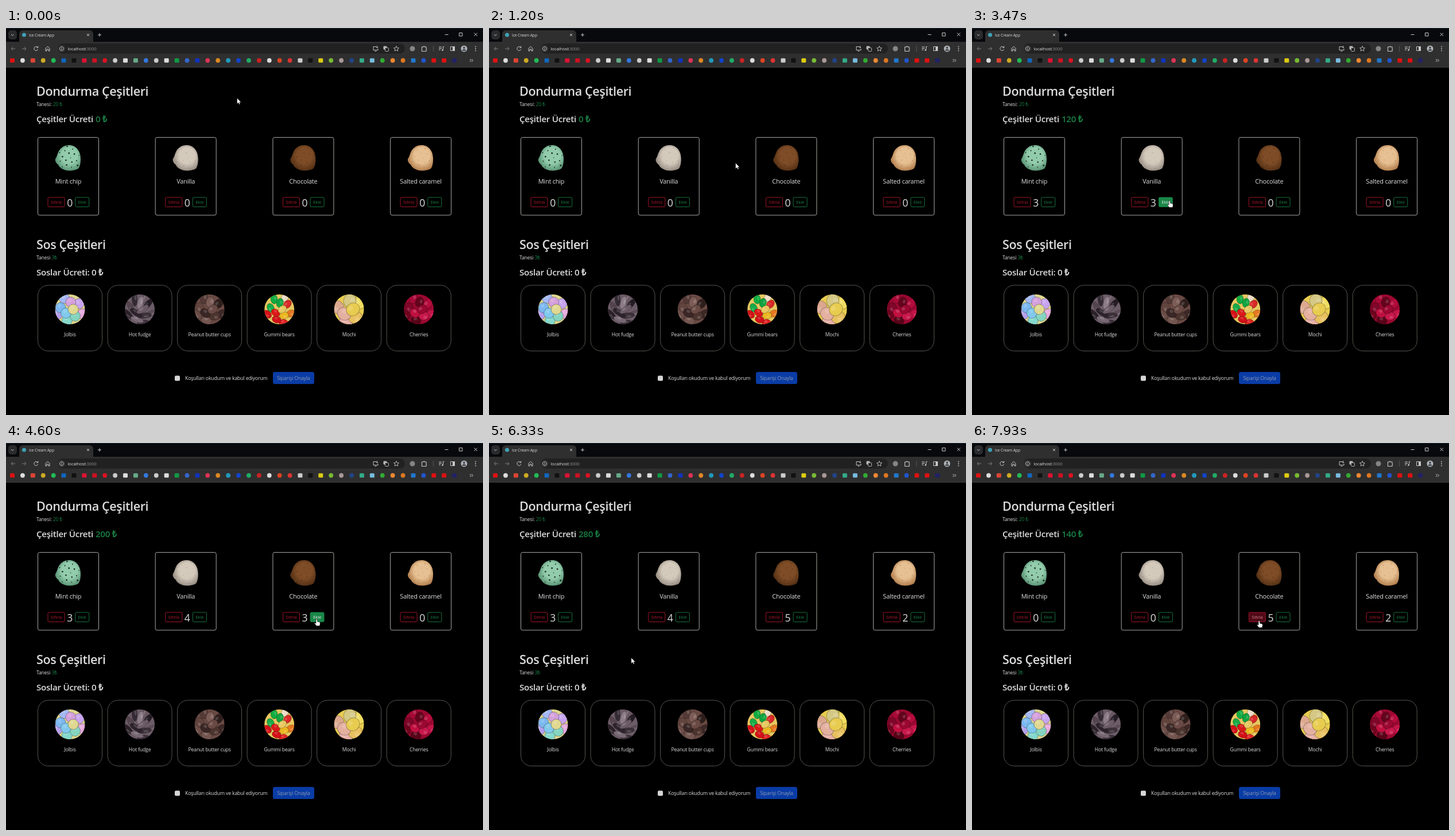
Animation, 831 px wide and 674 px high, one loop 8 s. Source, as an HTML page with a canvas:

```html
<!DOCTYPE html>
<html lang="tr">
<head>
<meta charset="utf-8">
<title>Ice Cream App</title>
<style>
  html, body { margin: 0; width: 100%; height: 100%; overflow: hidden; background: #000; }
  canvas, svg { position: absolute; left: 0; top: 0; width: 831px; height: 674px; }
  text { font-family: "Open Sans", "Noto Sans", sans-serif; letter-spacing: -.02em; white-space: pre; }
</style>
</head>
<body>
<canvas id="shapes" width="831" height="674"></canvas>
<svg id="layer" viewBox="0 0 831 674"></svg>
<script>
const g = document.getElementById('shapes').getContext('2d');
const layer = document.getElementById('layer');
const LOOP = 8000, STEP = 200 / 3, FADE = 150;
const WHITE = '#dcdcdc', GREEN = '#198045', RED = '#b4162c';

// ---------- helpers ----------
function box(x, y, w, h, r, fill, stroke) {
  g.beginPath();
  g.roundRect(x, y, w, h, r);
  if (fill) { g.fillStyle = fill; g.fill(); }
  if (stroke) { g.strokeStyle = stroke; g.lineWidth = 1; g.stroke(); }
}
function disc(x, y, r, fill) {
  g.beginPath();
  g.arc(x, y, r, 0, 7);
  g.fillStyle = fill;
  g.fill();
}
function line(d, color = '#c8c8c8', width = 1) {
  g.strokeStyle = color;
  g.lineWidth = width;
  g.stroke(new Path2D(d));
}
function random(seed) {
  return () => (seed = seed * 16807 % 2147483647) / 2147483647;
}
function node(tag, attrs, parent = layer) {
  const el = document.createElementNS('http://www.w3.org/2000/svg', tag);
  for (const k in attrs) el.setAttribute(k, attrs[k]);
  return parent.appendChild(el);
}
function text(x, y, size, str, fill = WHITE, anchor = 'start', weight = 400) {
  const el = node('text', { x, y, fill, 'font-size': size, 'text-anchor': anchor, 'font-weight': weight });
  el.textContent = str;
  return el;
}
function mix(a, b, k) {
  const part = (c, i) => parseInt(c.slice(i, i + 2), 16);
  return `rgb(${[1, 3, 5].map(i => Math.round(part(a, i) + (part(b, i) - part(a, i)) * k))})`;
}

// ---------- browser window ----------
function drawBrowser() {
  box(0, 0, 831, 25, 0, '#07090c');
  box(0, 0, 831, 1, 0, '#12222a');
  box(0, 24, 831, 44, 0, '#2f2f2f');
  box(0, 68, 831, 1, 0, '#3a3a3a');
  box(4, 4, 15, 16, 5, '#2a2b2c');
  line('M9 11l2.3 2.3 2.3-2.3');
  box(23, 4, 129, 24, [6, 6, 0, 0], '#2f2f2f');
  disc(31.5, 12, 3.6, '#3f9fb4');
  line('M141 10l4 4m0-4l-4 4M163 9v6m-3-3h6');
  line('M764.5 11.5h6M789.5 8.5h5.5v5.5h-5.5zM815.5 8.5l5.5 5.5m0-5.5l-5.5 5.5');

  line('M16 36H9m3-3l-3 3 3 3M28 36h7m-3-3l3 3-3 3', '#7c7c7c');
  line('M55 33.5a3.5 3.5 0 1 0 .7 3.5M55.8 31.5v2.7h-2.7');
  line('M69 35.5l3.5-3.5 3.5 3.5v4.5h-2v-3h-3v3h-2z');
  box(90, 27, 605, 17.5, 9, '#212121');
  disc(97, 36, 6.5, '#313131');
  line('M97 32.5a3.5 3.5 0 1 0 .01 0M97 35.5v2.5M97 34v.8', '#c8c8c8', .9);

  line('M645 32.5h-5v6h8v-2.5M642.5 40.5h3M646.5 31v4m-1.7-1.7l1.7 1.7 1.7-1.7');
  box(657.5, 31.5, 6, 6, 1, '#b8b8b8');
  box(660.5, 34.5, 6, 6, 1, '#212121', '#b8b8b8');
  line('M680 31.5l1.3 3 3.2.3-2.4 2.1.7 3.2-2.8-1.7-2.8 1.7.7-3.2-2.4-2.1 3.2-.3z', '#c8c8c8', .9);
  disc(708, 36, 4.5, '#858585');
  line('M724.5 33h2.5a1.4 1.4 0 0 1 2.6 0h2.4v2.7a1.4 1.4 0 0 1 0 2.4v2.4h-7.5z', '#c8c8c8', 1.1);
  line('M744.5 31v10', '#555');
  line('M754 33h5M754 35.5h5M754 38h3M761.5 38.5v-6h2');
  disc(760.4, 38.5, 1.3, '#c8c8c8');
  line('M774.5 32.5h7v7h-7z');
  box(778, 32, 4, 8, 0, '#c8c8c8');
  disc(798, 36, 5.5, '#b4b8bc');
  disc(798, 34.3, 2, '#4a4f55');
  box(794.8, 36.8, 6.4, 3.2, [3, 3, 1, 1], '#4a4f55');
  for (const y of [32.5, 36, 39.5]) disc(818, y, .9, '#c8c8c8');

  // o = round icon, s = square icon, then its colour
  const marks = 'sd11 oddd sd43 oca2 o2b5 s16b s111 sd13 sc12 od12 occc sddd s6a8 o37d occc sddd ' +
    's194 o36c s13b od35 od82 o29b o14c o2a6 oc22 oddd od42 od33 sccc s111 sdc1 o7b3 oa99 o248 ' +
    's3a8 s7bd o3a3 oe83 od72 s27c o25c sd11 sd11 s226';
  marks.split(' ').forEach((m, i) => {
    const x = 11 + i * 17.91, color = '#' + m.slice(1);
    if (m[0] === 'o') disc(x, 56.5, 3.9, color);
    else box(x - 4, 52.7, 8, 7.6, 1.5, color);
  });
  line('M808 54l2.3 2.5-2.3 2.5m3.2-5l2.3 2.5-2.3 2.5');

  text(40, 14.5, 6.75, 'Ice Cream App');
  text(107.5, 38.8, 7.85, 'localhost');
  text(138.3, 38.8, 7.85, ':3000', '#8e8e8e');
}

// ---------- pictures ----------
const SCOOP = new Path2D('M2-22C14-22 22-12 22 2C22 9 21 15 18 19C13 22 4 23-3 22C-10 20-15 17-17 12' +
  'C-20 10-23 6-22 2C-20-1-19-4-18-7C-15-16-8-22 2-22Z');

function drawScoop(x, light, dark, spots, spotColor, spotSize) {
  const rnd = random(41 + spots);
  g.save();
  g.translate(x, 226);
  const shade = g.createRadialGradient(3, -7, 4, 2, 0, 26);
  shade.addColorStop(0, light);
  shade.addColorStop(.45, light);
  shade.addColorStop(1, dark);
  g.fillStyle = shade;
  g.fill(SCOOP);
  g.clip(SCOOP);
  for (let i = 0; i < spots; i++) {
    const a = i * 2.4, r = 21 * Math.sqrt((i + .5) / spots);
    disc(1 + r * Math.cos(a), r * Math.sin(a), spotSize * (.6 + .6 * rnd()), spotColor);
  }
  g.restore();
}

// round photo: one overlapping piece per colour, on a sunflower layout
function drawPieces(x, colors, size, ratio) {
  const palette = colors.split(' '), n = palette.length;
  g.save();
  g.beginPath();
  g.arc(x, 490, 26, 0, 7);
  g.clip();
  g.fillStyle = '#' + palette[0];
  g.fillRect(x - 26, 464, 52, 52);
  for (let i = n - 1; i >= 0; i--) {
    const a = i * 2.4, r = 25 * Math.sqrt((i + .5) / n);
    g.save();
    g.translate(x + r * Math.cos(a), 490 + r * Math.sin(a));
    g.rotate(ratio < 1 ? a * .5 - .6 : 0);
    g.scale(1, ratio);
    disc(0, 0, size, '#' + palette[i]);
    g.strokeStyle = 'rgba(0,0,0,.3)';
    g.lineWidth = 1;
    g.stroke();
    disc(-size * .2, -size * .35, size * .35, 'rgba(255,255,255,.15)');
    g.restore();
  }
  g.restore();
}

// ---------- page ----------
const flavours = [
  ['Mint chip', '#92ccac', '#4f8a6a', 17, '#1c2a22', 1.3],
  ['Vanilla', '#d4cabc', '#8c8278', 14, 'rgba(110,95,80,.3)', 1],
  ['Chocolate', '#7e4c26', '#4e2c12', 15, 'rgba(60,30,10,.35)', 1.2],
  ['Salted caramel', '#e6c092', '#a8703e', 16, 'rgba(165,105,55,.35)', 1.1]
];
const sauces = [
  ['Jolbis', 'e0d890 80c8ec d4a0dc 84d4c0 7cb8f0 c8a4f0 84d8cc a4b8f4 e4a8dc b4a0ec', 9, 1],
  ['Hot fudge', '6c5c68 2c222c 8c7c88 3c3038 54444e 241c24 786874 342a34 5c4c58 2a2028 685862 382c36', 12, .4],
  ['Peanut butter cups', '6a4a44 3a2624 7c5c56 4c342e 62443e 2e1e1c 745650 543a36 3c2826 6c4e48', 9.5, .75],
  ['Gummi bears', 'e8c860 dc1818 10a440 ecb820 18ac48 d82828 d41018 10ac40 e47820 d41018 ecdcc4 e02020', 8, .75],
  ['Mochi', 'e8cc50 e4b0a0 d4c884 e8c060 dca890 f0dc60 e8b0a8', 12, .9],
  ['Cherries', '9c0830 c01040 64041c c8184c 80062a b40c3c 580418 a80a38 c41448 70041e', 9, .8]
];
const cardX = i => 55.5 + i * 204.7;

function makeButton(x, w, label, color, fill) {
  node('rect', { x, y: 295, width: w, height: 16.5, rx: 2, fill: 'none', stroke: color, 'stroke-width': .9 });
  const face = node('rect', { x, y: 295, width: w, height: 16.5, rx: 2, fill });
  const caption = text(x + w / 2, 306.2, 7.8, label, color, 'middle');
  return {
    contains: p => p.x >= x && p.x <= x + w && p.y >= 295 && p.y <= 311.5,
    show(k) {
      face.setAttribute('fill-opacity', k);
      caption.setAttribute('fill', mix(color, '#e4e4e4', k));
    }
  };
}

drawBrowser();
text(53, 117.7, 21.6, 'Dondurma Çeşitleri', WHITE, 'start', 600);
text(53, 136.2, 8.6, 'Tanesi:');
text(81.8, 136.2, 8.6, '20 ₺', GREEN);
text(53, 164.3, 15.2, 'Çeşitler Ücreti', WHITE, 'start', 600);
const price = text(156, 164.3, 15.2, '', GREEN, 'start', 600);
text(53, 384.7, 21.6, 'Sos Çeşitleri', WHITE, 'start', 600);
text(53, 403.2, 8.6, 'Tanesi');
text(79.5, 403.2, 8.6, '3₺', GREEN);
text(53, 431.3, 15.2, 'Soslar Ücreti: 0 ₺', WHITE, 'start', 600);

const buttons = [], counts = [];
flavours.forEach(([name, ...look], i) => {
  const x = cardX(i);
  box(x, 190.5, 106, 135.5, 3, null, '#a6a8a2');
  drawScoop(x + 52.5, ...look);
  text(x + 53, 270.5, 11, name, WHITE, 'middle');
  buttons.push(makeButton(x + 17.5, 29, 'Sıfırla', RED, '#a01430'));
  counts.push(text(x + 55.5, 310.5, 17.6, '0', WHITE, 'middle'));
  buttons.push(makeButton(x + 65.2, 24, 'Ekle', GREEN, '#198748'));
});
sauces.forEach(([name, ...look], i) => {
  const x = 55.5 + i * 121.55;
  box(x, 448, 112, 114.5, 18, null, '#55564f');
  drawPieces(x + 56, ...look);
  text(x + 56, 536.5, 8.7, name, WHITE, 'middle');
});
box(294, 605.5, 9, 9, 2, '#d6d6d6');
text(312, 612.7, 8.75, 'Koşulları okudum ve kabul ediyorum');
box(465, 599, 72, 21, 3.5, '#0a3ca6');
text(501, 612.7, 8.75, 'Siparişi Onayla', '#8f9aae', 'middle');

const arrow = node('path', {
  d: 'M0 0V10.2L2.4 8 4 11.3 5.6 10.6 4.1 7.4H7.1Z',
  fill: '#fff', stroke: '#000', 'stroke-width': .5
});
const hand = node('path', {
  d: 'M-1 1Q-1-.5 .2-.5Q1.4-.5 1.4 1V4L5 4.8Q6.5 5.2 6.3 7L5.6 11.5H-.2L-3.4 7.4Q-3.6 6-2.2 6.2L-1 7.2Z',
  fill: '#fff', stroke: '#000', 'stroke-width': .6
});

// ---------- motion ----------
// pointer stops: time, x, y
const path = [
  [0, 402.5, 122], [70, 402.5, 122], [600, 417, 172], [1200, 429.5, 235], [1670, 135, 306],
  [2670, 135, 306], [3070, 344, 301], [3670, 344, 301], [4000, 541, 307], [4930, 541, 307],
  [5400, 745, 309], [5730, 745, 309], [6130, 420, 396], [6530, 106, 335], [6730, 90, 307],
  [6930, 90, 307], [7000, 96, 309], [7070, 163.5, 313.5], [7330, 291, 306], [7530, 291, 306],
  [7870, 500, 310], [8000, 500, 310]
];
// clicks: time, card, new count
const clicks = [
  [2070, 0, 1], [2330, 0, 2], [2530, 0, 3],
  [3130, 1, 1], [3330, 1, 2], [3470, 1, 3], [3670, 1, 4],
  [4070, 2, 1], [4270, 2, 2], [4530, 2, 3], [4730, 2, 4], [4930, 2, 5],
  [5530, 3, 1], [5730, 3, 2],
  [6870, 0, 0], [7530, 1, 0]
];

// the picture advances fifteen times a second
const snap = t => Math.floor((t + 5) / STEP) * STEP;

function slope(i, axis) {
  const a = path[i - 1], p = path[i], b = path[i + 1];
  if (!a || !b || a[axis] === p[axis] || b[axis] === p[axis]) return 0;
  return (b[axis] - a[axis]) / (b[0] - a[0]);
}
function pointer(time) {
  const t = Math.max(0, snap(time));
  let i = 0;
  while (i < path.length - 2 && t >= path[i + 1][0]) i++;
  const a = path[i], b = path[i + 1], span = b[0] - a[0];
  const s = Math.min(1, (t - a[0]) / span), s2 = s * s, s3 = s2 * s;
  const at = axis => (2 * s3 - 3 * s2 + 1) * a[axis] + (3 * s2 - 2 * s3) * b[axis] +
    span * ((s3 - 2 * s2 + s) * slope(i, axis) + (s3 - s2) * slope(i + 1, axis));
  return { x: at(1), y: at(2) };
}

function render(now) {
  const t = snap(now % LOOP);
  const pos = pointer(t), totals = [0, 0, 0, 0];
  for (const [time, card, value] of clicks) if (t + 5 >= time) totals[card] = value;
  totals.forEach((n, i) => counts[i].textContent = n);
  price.textContent = totals.reduce((a, b) => a + b) * 20 + ' ₺';

  // share of the last moments spent over a button = how far its fill has faded in
  const trail = [0, 1, 2, 3, 4, 5].map(k => pointer(t - k * FADE / 6));
  let over = false;
  for (const b of buttons) {
    b.show(trail.filter(b.contains).length / trail.length);
    over = over || b.contains(pos);
  }
  const place = `translate(${pos.x.toFixed(1)} ${pos.y.toFixed(1)})`;
  for (const el of [arrow, hand]) {
    el.setAttribute('transform', place);
    el.setAttribute('visibility', (el === hand) === over ? 'visible' : 'hidden');
  }
}

const start = performance.now();
function tick() {
  render(performance.now() - start);
  requestAnimationFrame(tick);
}
tick();
</script>
</body>
</html>
```
